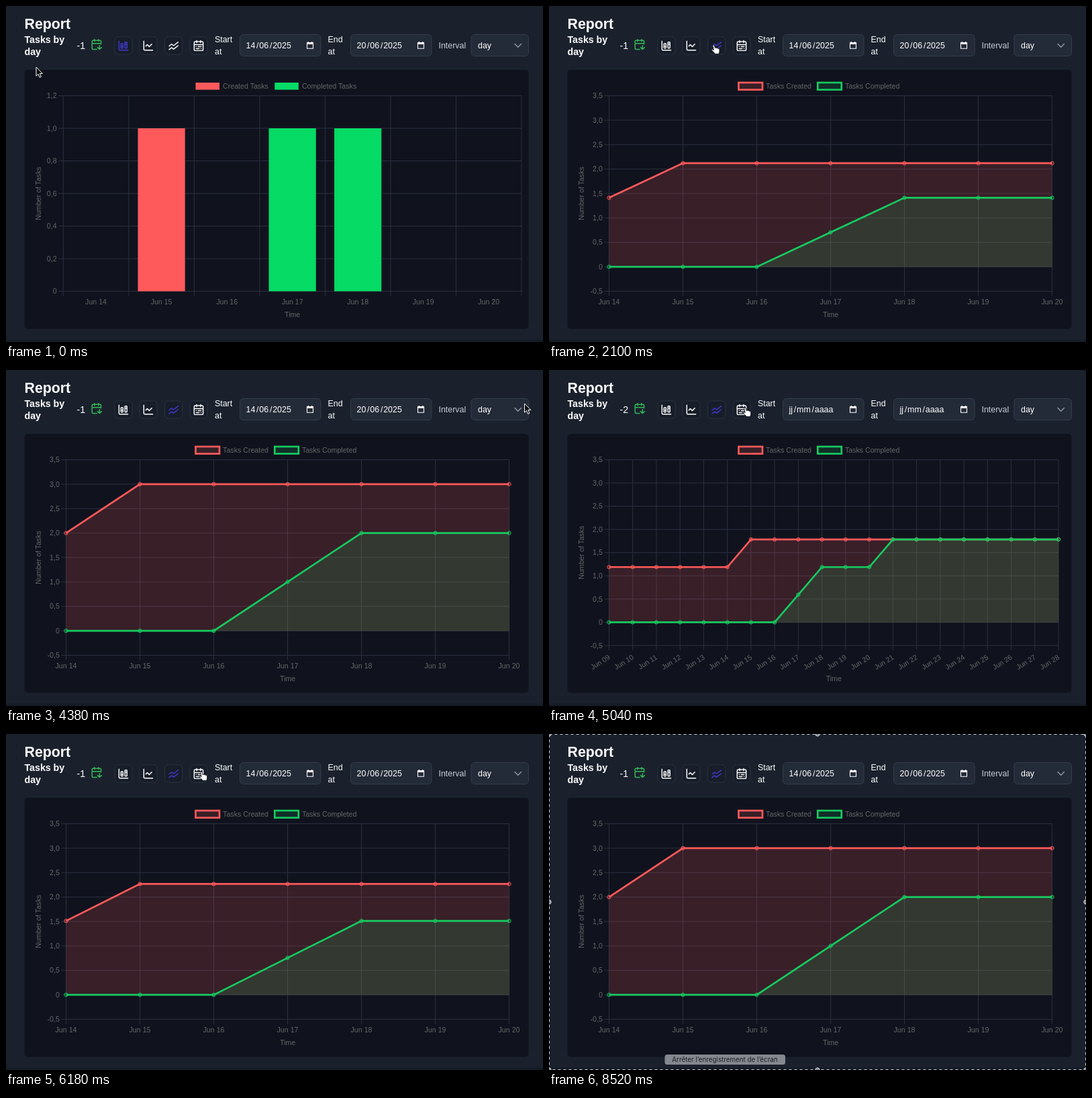
Write an HTML page that moves like this. It is 800 px wide and 500 px high and loops after 8580 ms.

```html
<!DOCTYPE html>
<html lang="en">
<head>
<meta charset="utf-8">
<title>Report</title>
<style>
  html, body { margin: 0; width: 100%; height: 100%; overflow: hidden; background: #1a212d; }
  svg { display: block; }
  #stage { width: 800px; height: 500px; font-family: "Liberation Sans", Arial, sans-serif; }
  text { white-space: pre; }
  .label { font-size: 10.64px; fill: #666; }
  .ui { font-size: 12.42px; fill: #fff; }
  .bold { font-weight: 700; font-size: 14.2px; fill: #fff; }
  .grid { stroke: #2b3040; stroke-width: 1; fill: none; }
  .icon { fill: none; stroke: #fff; stroke-width: 2; stroke-linecap: round; stroke-linejoin: round; }
  .icon.on { stroke: #4338d0; }
  .button { fill: #171e29; stroke: #2b3341; }
  .field { fill: #242b38; stroke: #343c4a; }
</style>
</head>
<body>
<svg id="stage" viewBox="0 0 800 500">
  <rect width="800" height="500" fill="#1a212d"/>
  <rect y="496" width="800" height="4" fill="#161c27"/>
  <text x="27.5" y="34" class="bold" style="font-size:21.3px">Report</text>
  <text x="27.5" y="55" class="bold">Tasks by</text>
  <text x="27.5" y="73" class="bold">day</text>
  <text id="count" x="105.5" y="63.5" class="ui" style="font-size:14.2px"></text>
  <g id="tools"></g>
  <text x="311" y="54" class="ui">Start</text>
  <text x="311" y="72" class="ui">at</text>
  <text x="479.5" y="54" class="ui">End</text>
  <text x="479.5" y="72" class="ui">at</text>
  <g id="dates"></g>
  <text x="644.5" y="63" class="ui" style="fill:#c9cdd5">Interval</text>
  <rect x="693" y="42.5" width="85.5" height="32" rx="5" class="field"/>
  <text x="703" y="63" class="ui">day</text>
  <path d="M758 56.5l4.7 4.7 4.7-4.7" fill="none" stroke="#9299a5" stroke-width="1.4"
    stroke-linecap="round" stroke-linejoin="round"/>
  <rect x="27.5" y="95" width="751" height="385.5" rx="5" fill="#10131e"/>
  <g id="axes"></g>
  <g id="series"></g>
  <g id="overlay">
    <rect x=".5" y=".5" width="799" height="499" fill="none" stroke="#15181f"/>
    <rect x=".5" y=".5" width="799" height="499" fill="none" stroke="#d5d7da" stroke-dasharray="4 4"/>
    <g id="handles" fill="#85888e" stroke="#d8dadd"></g>
  </g>
  <g id="tip">
    <rect x="172.5" y="477" width="179.5" height="15" rx="3.5" fill="#85888f"/>
    <text x="262" y="487.8" text-anchor="middle" fill="#1b1d21"
      style="font:9.8px Inter,sans-serif" textLength="">Arrêter l’enregistrement de l’écran</text>
  </g>
  <g id="cursor">
    <path id="arrow" d="M0 0V13.2L3 10.4 5.1 15.3 7.4 14.3 5.3 9.5H9.4Z" fill="#0b0b0d" stroke="#fff"
      stroke-width="1" stroke-linejoin="round"/>
    <path id="hand" d="M-.3 1.2C-.3-.4 2-.4 2.3 1L3.1 4.6C3.4 3.5 5.2 3.6 5.4 4.9 5.8 4 7.4 4.3 7.6 5.5
      8.2 4.9 9.5 5.3 9.6 6.6L9.8 9.2C9.9 10.8 8.9 11.6 8.8 13.3H2.7C2.4 11.6 .2 10.3-1.6 8
      -2.3 7-1 6 0 6.8L1.1 7.7Z" fill="#fff" stroke="#08090c" stroke-width=".9" stroke-linejoin="round"/>
  </g>
</svg>
<script>
const LOOP = 8580, STEP = 60, GROW = 1000;
const RED = '#ff5a5a', GREEN = '#16cb60', INDIGO = '#3a2ab0';
const $ = id => document.getElementById(id);
const range = (n, f) => Array.from({ length: n }, (_, i) => f(i));

// Running totals by day of June
const created = d => 2 + (d >= 15);
const completed = d => (d >= 17) + (d >= 18) + (d >= 21);
const open = d => created(d) - completed(d);

const totals = [
  { name: 'Tasks Created', color: RED, alpha: .17, value: created },
  { name: 'Tasks Completed', color: GREEN, alpha: .15, value: completed }
];
const bar = {
  tool: 0, left: 85.3, right: 768, top: 133.5, bottom: 424.5, min: 0, max: 1.2, step: .2, digits: 1,
  day: 14, n: 7, bars: true,
  sets: [
    { name: 'Created Tasks', color: '#fe5a5c', value: d => +(d === 15) },
    { name: 'Completed Tasks', color: '#05db65', value: d => +(d === 17 || d === 18) }
  ]
};
const line = {
  tool: 1, left: 76.5, right: 749.5, top: 113.5, bottom: 424.5, min: 0, max: 4, step: 1, digits: 0,
  day: 14, n: 7, sets: [{ color: INDIGO, alpha: .32, value: open }]
};
const multi = {
  tool: 2, left: 89.5, right: 749.5, top: 133.5, bottom: 424.5, min: -.5, max: 3.5, step: .5, digits: 1,
  day: 14, n: 7, sets: totals
};
const wide = { ...multi, right: 759, bottom: 410, day: 9, n: 20, tilt: true };

const scenes = [
  { at: -GROW, chart: bar }, { at: 529, chart: line }, { at: 1836, chart: multi },
  { at: 4838, chart: wide }, { at: 5883, chart: multi }
];

// Cursor path: time, x, y
const path = [
  [0, 45, 91], [100, 45, 91], [300, 125, 8], [480, 215, 56], [1140, 216, 56], [1640, 216, 55],
  [1800, 244, 58], [2650, 245, 58], [3100, 793, 60], [3180, 793, 60], [3300, 808, 60], [3680, 808, 60],
  [3860, 775, 50], [4560, 772, 50], [4800, 290, 56], [5040, 291, 56], [6180, 290, 56], [6800, 290, 56],
  [7140, 330, 24], [7500, 330, 24], [8160, 265, 420], [8280, 258, 512], [LOOP, 258, 512]
];

const icons = [
  'M11 13H7M19 9h-4M3 3v16a2 2 0 0 0 2 2h16M16 5h2a1 1 0 0 1 1 1v10a1 1 0 0 1-1 1h-2a1 1 0 0 1-1-1V6a1 1 0 0 1 1-1z' +
    'M8 8h2a1 1 0 0 1 1 1v7a1 1 0 0 1-1 1H8a1 1 0 0 1-1-1V9a1 1 0 0 1 1-1z',
  'M3 3v16a2 2 0 0 0 2 2h16M19 9l-5 5-4-4-3 3',
  'M3 13l5-4 4 3 9-7M3 20l5-4 4 3 9-7',
  'M8 2v4M16 2v4M3 10h18M5 4h14a2 2 0 0 1 2 2v14a2 2 0 0 1-2 2H5a2 2 0 0 1-2-2V6a2 2 0 0 1 2-2z' +
    'M17 14h-6M13 18H7M7 14h.01M17 18h.01'
];
const download = 'M14 18l4 4 4-4M16 2v4M18 14v8M21 11.35V6a2 2 0 0 0-2-2H5a2 2 0 0 0-2 2v14a2 2 0 0 0 2 2h7.34M3 10h18M8 2v4';
const toolX = [175, 212, 249.7, 287];

const text = (x, y, s, anchor = 'middle', extra = '') =>
  `<text class="label" x="${x}" y="${y}" text-anchor="${anchor}" ${extra}>${s}</text>`;
const rect = (x, y, w, h, attrs) => `<rect x="${x}" y="${y}" width="${w}" height="${h}" ${attrs}/>`;
const icon = (d, x, y, attrs) =>
  `<path class="icon" d="${d}" transform="translate(${x} ${y}) scale(.74)" ${attrs}/>`;

const yAt = (c, v) => c.bottom - (v - c.min) / (c.max - c.min) * (c.bottom - c.top);
const xAt = (c, i) => c.left + (c.right - c.left) * i / (c.bars ? c.n : c.n - 1);

function drawAxes(c) {
  let grid = '', out = '';
  const rows = Math.round((c.max - c.min) / c.step);
  for (let i = 0; i <= rows; i++) {
    const v = c.min + i * c.step, y = yAt(c, v);
    grid += `M${c.left - 7} ${y}H${c.right}`;
    const s = Math.abs(v) < 1e-6 ? '0' : v.toFixed(c.digits).replace('.', ',');
    out += text(c.left - 9.7, y + 3.7, s, 'end');
  }
  for (let i = 0; i < c.n + (c.bars ? 1 : 0); i++)
    grid += `M${xAt(c, i)} ${c.top}V${c.bottom + 7}`;
  for (let i = 0; i < c.n; i++) {
    const x = xAt(c, c.bars ? i + .5 : i), s = 'Jun ' + String(c.day + i).padStart(2, '0');
    out += c.tilt
      ? text(0, 3.7, s, 'end', `transform="translate(${x + .3} 426.3) rotate(-32)"`)
      : text(x, 444, s);
  }
  out += text((c.left + c.right) / 2, 463.3, 'Time');
  out += text(0, 3.7, 'Number of Tasks', 'middle',
    `transform="translate(48 ${(c.top + c.bottom) / 2}) rotate(-90)"`);
  if (c.sets.length > 1) c.sets.forEach((s, i) => {
    const x = 282.5 + i * 117.8;
    out += rect(x, 114, 35.5, 10.6, c.bars ? `fill="${s.color}"`
      : `fill="${s.color}" fill-opacity="${s.alpha}" stroke="${s.color}" stroke-width="2.66"`);
    out += text(x + 40.6, 123, s.name, 'start');
  });
  return `<path class="grid" d="${grid}"/>` + out;
}

function drawBars(c) {
  const w = (c.right - c.left) / c.n;
  return c.sets.map(s => range(c.n, i => {
    const y = yAt(c, s.value(c.day + i));
    return y < c.bottom
      ? rect(xAt(c, i) + w * .14, y, w * .72, c.bottom - y, `fill="${s.color}"`) : '';
  }).join('')).join('');
}

function drawLines(c, grow) {
  const zero = yAt(c, 0);
  return c.sets.map(s => {
    const pts = range(c.n, i => [xAt(c, i), yAt(c, s.value(c.day + i) * grow)]);
    const d = 'M' + pts.map(p => p.join(' ')).join('L');
    const dots = pts.map(([x, y]) => `<circle cx="${x}" cy="${y}" r="2.66"/>`).join('');
    return `<path d="${d}L${c.right} ${zero}H${c.left}Z" fill="${s.color}" fill-opacity="${s.alpha}"/>
      <path d="${d}" fill="none" stroke="${s.color}" stroke-width="2.66"/>
      <g fill="${s.color}" fill-opacity="${s.alpha}" stroke="${s.color}">${dots}</g>`;
  }).join('');
}

function drawTools(active) {
  const buttons = icons.map((d, i) =>
    rect(toolX[i] - 13, 46, 26, 26, 'rx="5.5" class="button"') +
    icon(d, toolX[i] - 8.9, 50.1, i === active ? 'style="stroke:#4338d0"' : ''));
  return icon(download, 126, 48.3, 'style="stroke:#35b957"') + buttons.join('');
}

function drawDates(values) {
  return values.map((value, i) => {
    const x = 348.5 + i * 165;
    const [d, m, y] = value.split('/');
    return rect(x, 42.5, 120.5, 32, 'rx="5" class="field"') +
      `<text class="ui" x="${x + 9}" y="63">${d}<tspan dx="1.7">/</tspan><tspan dx=".9">${m}</tspan>` +
      `<tspan dx="1.7">/</tspan><tspan dx=".9">${y}</tspan></text>` +
      `<path d="M${x + 100} 54.5h9v8.7h-9z" fill="none" stroke="#fff" stroke-width="1.1"/>` +
      `<path d="M${x + 99.5} 54h10v3h-10zM${x + 101.2} 53h1.3v2h-1.3zM${x + 106.5} 53h1.3v2h-1.3z" fill="#fff"/>`;
  }).join('');
}

function cursorAt(t) {
  const i = path.findIndex(p => p[0] > t), [t0, x0, y0] = path[i - 1], [t1, x1, y1] = path[i];
  const u = (t - t0) / (t1 - t0), e = u * u * (3 - 2 * u);
  return [x0 + (x1 - x0) * e, y0 + (y1 - y0) * e];
}

const show = (id, on) => $(id).setAttribute('visibility', on ? 'visible' : 'hidden');
let scene, last;

function enter(next) {
  scene = next;
  const c = scene.chart;
  $('axes').innerHTML = drawAxes(c);
  $('tools').innerHTML = drawTools(c.tool);
  $('count').textContent = c === wide ? '-2' : '-1';
  $('dates').innerHTML = drawDates(c === wide
    ? ['jj/mm/aaaa', 'jj/mm/aaaa'] : ['14/06/2025', '20/06/2025']);
}

function render(t) {
  const next = scenes.filter(s => s.at <= t).pop();
  if (next !== scene) enter(next);
  const c = scene.chart;
  const grow = 1 - (1 - Math.min(1, (t - scene.at) / GROW)) ** 4;
  $('series').innerHTML = c.bars ? drawBars(c) : drawLines(c, grow);

  const [x, y] = cursorAt(t);
  const pointing = toolX.some(b => Math.abs(x - b) < 13) && Math.abs(y - 59) < 13;
  $('cursor').setAttribute('transform', `translate(${x} ${y})`);
  show('hand', pointing);
  show('arrow', !pointing);
  show('overlay', t >= 7560);
  show('tip', t >= 8400);
}

$('tip').lastElementChild.removeAttribute('textLength');
$('handles').innerHTML = [0, 400, 800].map(x => [0, 250, 500].map(y =>
  x === 400 && y === 250 ? '' : `<circle cx="${x}" cy="${y}" r="3.2"/>`).join('')).join('');

const start = performance.now();
function tick() {
  const t = Math.floor((performance.now() - start) % LOOP / STEP) * STEP;
  if (t !== last) render(last = t);
  requestAnimationFrame(tick);
}
tick();
</script>
</body>
</html>
```
